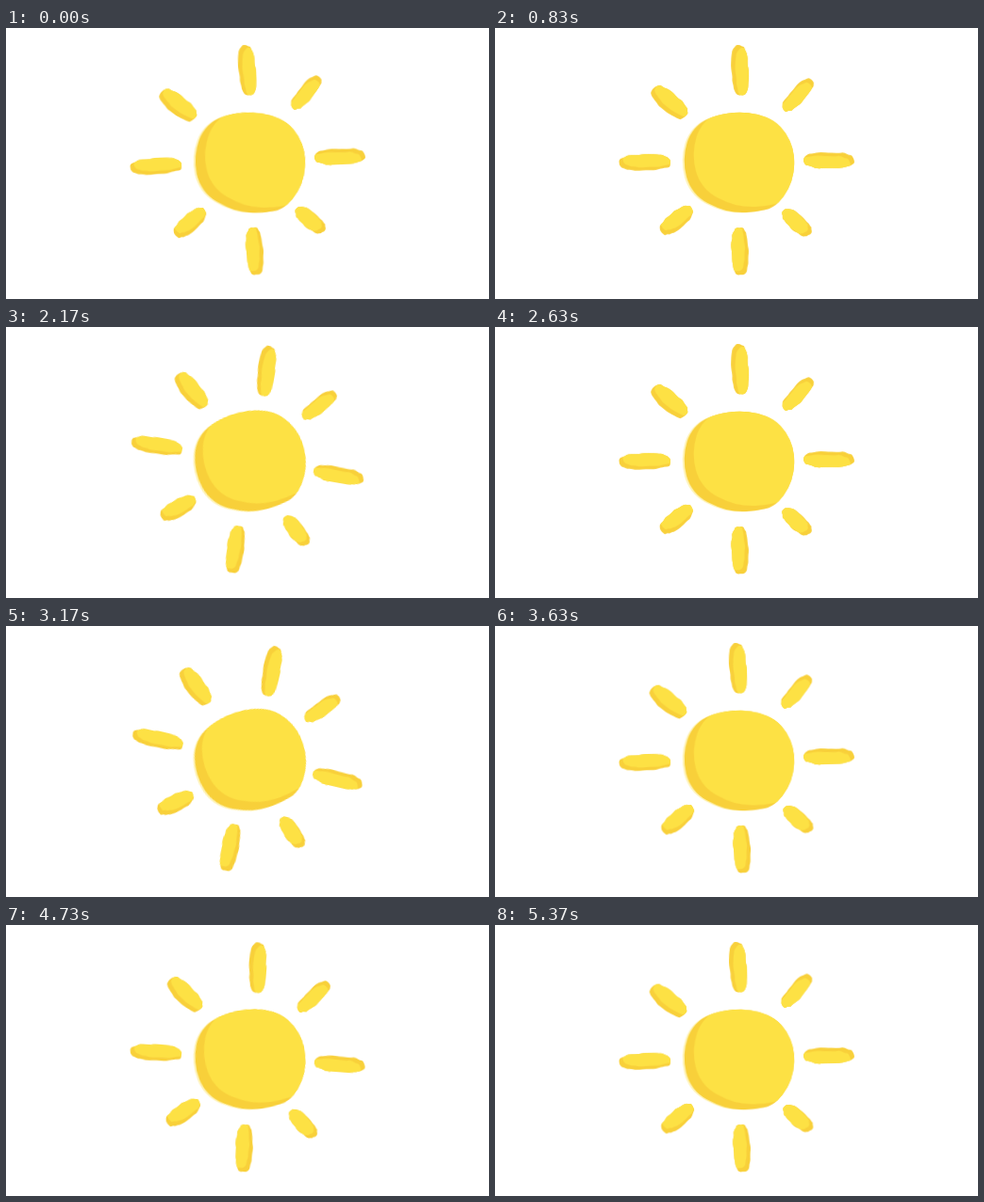
Write an HTML page that moves like this. It is 512 px wide and 288 px high and loops after 5410 ms.

```html
<!DOCTYPE html>
<html lang="en">
<head>
<meta charset="utf-8">
<title>Wobbling sun</title>
<style>
  html, body { margin: 0; width: 100%; height: 100%; overflow: hidden; background: #fff; }
  svg { display: block; width: 100vw; height: 100vh; }
  #rays, #disc { animation: 901.667ms -10ms infinite; }
  #rays { transform-origin: 257px 141px; animation-name: rays; }
  #disc { transform-origin: 258.5px 142px; animation-name: disc; }
  /* 14 drawn steps out, 13 back */
  @keyframes rays {
    0% { transform: rotate(-2.3deg); animation-timing-function: steps(14); }
    51.852% { transform: rotate(13.2deg); animation-timing-function: steps(13); }
    100% { transform: rotate(-2.3deg); }
  }
  @keyframes disc {
    0% { transform: rotate(3deg); animation-timing-function: steps(14); }
    51.852% { transform: rotate(-18deg); animation-timing-function: steps(13); }
    100% { transform: rotate(3deg); }
  }
</style>
</head>
<body>
<svg viewBox="0 0 512 288">
  <defs></defs>
  <g id="rays"></g>
  <g id="disc"></g>
</svg>
<script>
const LIGHT = '#fde144', DARK = '#f8d03a', HALO = '#fef3b8';
const defs = document.querySelector('defs');
const rays = document.getElementById('rays');
const disc = document.getElementById('disc');

let seed = 7;
const jitter = amount => {
  seed = (seed * 16807) % 2147483647;
  return (seed / 2147483647 - 0.5) * 2 * amount;
};

function add(parent, tag, attrs) {
  const el = document.createElementNS('http://www.w3.org/2000/svg', tag);
  for (const key in attrs) el.setAttribute(key, attrs[key]);
  return parent.appendChild(el);
}

// Closed curve through the midpoints of the given points
function smooth(points) {
  const mid = (a, b) => `${((a[0] + b[0]) / 2).toFixed(2)} ${((a[1] + b[1]) / 2).toFixed(2)}`;
  const n = points.length;
  let d = `M${mid(points[n - 1], points[0])}`;
  points.forEach((p, i) => {
    d += `Q${p[0].toFixed(2)} ${p[1].toFixed(2)} ${mid(p, points[(i + 1) % n])}`;
  });
  return d + 'Z';
}

// Dark shape with a shifted light copy on top, leaving a shaded crescent
function paint(parent, id, d, dx, dy) {
  add(add(defs, 'clipPath', { id }), 'path', { d });
  add(parent, 'path', { d, fill: DARK });
  const clip = add(parent, 'g', { 'clip-path': `url(#${id})` });
  add(clip, 'path', { d, fill: LIGHT, transform: `translate(${dx} ${dy})` });
}

function capsule(x1, y1, x2, y2, width) {
  const length = Math.hypot(x2 - x1, y2 - y1);
  const ux = (x2 - x1) / length, uy = (y2 - y1) / length;
  const power = (v, e) => Math.sign(v) * Math.abs(v) ** e;
  const points = [];
  for (let i = 0; i < 36; i++) {
    const a = i / 36 * 2 * Math.PI;
    const u = power(Math.cos(a), 0.85) * length / 2 + jitter(0.7);
    const v = power(Math.sin(a), 0.7) * width / 2 + jitter(0.7);
    points.push([(x1 + x2) / 2 + u * ux - v * uy, (y1 + y2) / 2 + u * uy + v * ux]);
  }
  return smooth(points);
}

// x1, y1, x2, y2, width, light shift x, y
[
  [258, 18, 261, 72, 18, 4.5, 3],
  [336, 55, 306.5, 87, 16, -2, 4.5],
  [327, 140.5, 380.5, 140.5, 17, -4, 3.5],
  [306, 194, 334, 219, 17, -4, -3],
  [259, 212, 260.5, 262.5, 18, -4, -4],
  [208.5, 191.5, 177, 217, 18, 1, -5],
  [186.5, 142.5, 131.5, 143.5, 17, 4, -3.5],
  [167.5, 64, 202, 94, 20, 4, -3]
].forEach(([x1, y1, x2, y2, width, dx, dy], i) =>
  paint(rays, 'ray' + i, capsule(x1, y1, x2, y2, width), dx, dy));

const outline = smooth([
  [235, 92.5], [258, 89.5], [279, 91.5], [296, 98.5], [309, 112], [316, 128], [318, 145],
  [315, 163], [307, 179], [294.5, 191], [278, 195.5], [255, 196.5], [235, 191.5],
  [217, 181.5], [205.5, 167], [200.5, 149], [201, 130], [206, 113], [218, 99.5]
].map(([x, y]) => [x + jitter(0.4), y + jitter(0.4)]));

add(disc, 'path', { d: outline, fill: HALO, transform: 'translate(-2 0.5)' });
paint(disc, 'face', outline, 10, -6);
</script>
</body>
</html>
```
